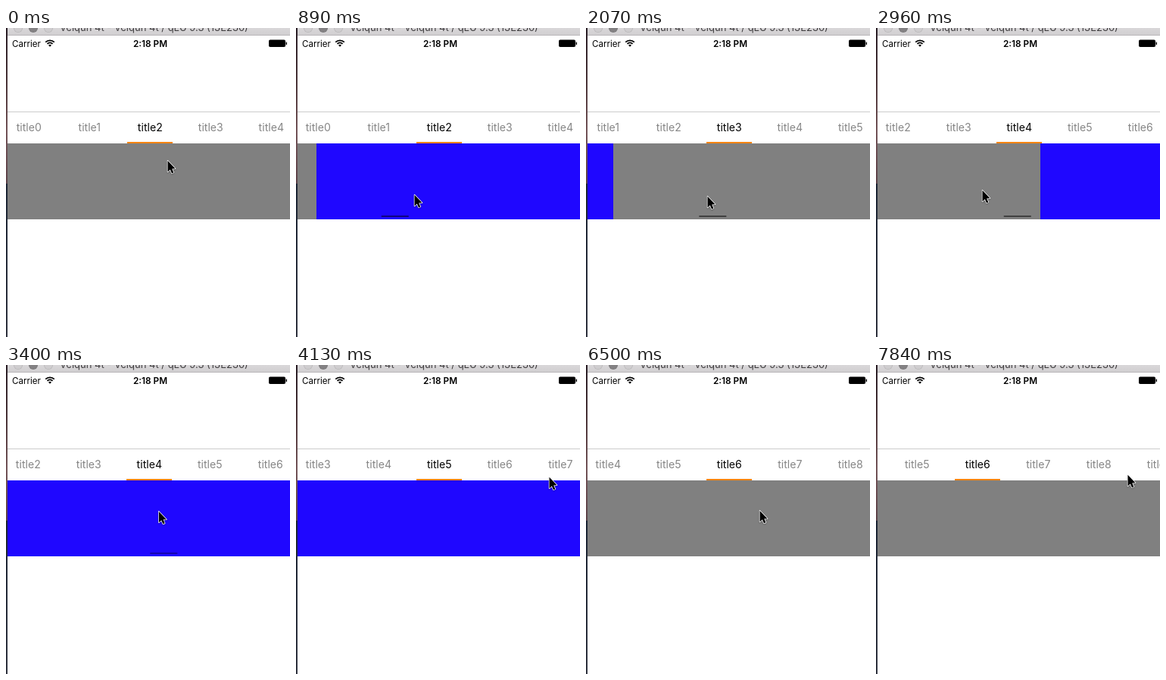
Recreate the animation shown at these times as an HTML page with a canvas. Size 375 by 407 pixels, loop 7990 ms.

```html
<!DOCTYPE html>
<html lang="en">
<head>
<meta charset="utf-8">
<title>Tabbed pager</title>
<style>
  html, body { margin: 0; width: 100%; height: 100%; overflow: hidden; background: #fff; }
  canvas { display: block; width: 375px; height: 407px; }
</style>
</head>
<body>
<canvas id="stage"></canvas>
<script>
const W = 375, H = 407, LOOP = 7990, STEP = 148, LAST = 53;
const LEFT = 2, PAGE_W = 375, TAB_GAP = 80, TAB_MID = 189, TABS = 10;
const FONT = 'Inter, "Open Sans", sans-serif';

// Times count screen refreshes of STEP ms.
const SWIPES = [2.632, 10.744, 18.196];
const SWIPE_TIME = 4, SETTLE = 5, TAP = 38.5;

// Tab bar movements: start, duration, distance in tabs.
const GLIDES = [
  [0, 1, 0.0125],
  ...SWIPES.map(s => [s + SETTLE, 2.5, 1]),
  [32, 5, 2.15],
  [38, 2.5, -1.15],
  [49, 4, 0.6875]
];

// Turning points of the pointer: time, x, y.
const POINTER = [
  [0, 213, 174], [3, 290, 218], [6, 156, 219], [11, 300, 224],
  [14, 160, 221], [18, 290, 216], [20, 140, 213], [28, 334, 147],
  [37, 256, 132], [39, 92, 130], [45, 240, 196], [50, 366, 136], [53, 332, 144]
];

const canvas = document.getElementById('stage');
const ctx = canvas.getContext('2d');
const dpr = window.devicePixelRatio || 1;
canvas.width = W * dpr;
canvas.height = H * dpr;

const sum = list => list.reduce((a, b) => a + b, 0);

function ease(n, start, duration) {
  const u = Math.max(0, Math.min(1, (n - start) / duration));
  return u * u * (3 - 2 * u);
}

function pointerAt(n) {
  const i = Math.max(1, POINTER.findIndex(p => p[0] >= n));
  const [t0, x0, y0] = POINTER[i - 1], [t1, x1, y1] = POINTER[i];
  const u = ease(n, t0, t1 - t0);
  return [x0 + (x1 - x0) * u, y0 + (y1 - y0) * u];
}

function stateAt(n) {
  const tapped = n >= TAP ? 1 : 0;
  return {
    page: 2 + tapped + sum(SWIPES.map(s => ease(n, s, SWIPE_TIME))),
    selected: 2 + tapped + SWIPES.filter(s => n >= s + SETTLE).length,
    scroll: 1.9875 + sum(GLIDES.map(([s, d, by]) => by * ease(n, s, d))),
    bar: sum(SWIPES.map(s => ease(n, s, 1) - ease(n, s + SWIPE_TIME, 2)))
  };
}

function rect(x, y, w, h, color) {
  ctx.fillStyle = color;
  ctx.fillRect(x, y, w, h);
}

function pill(x, y, w, h, r, color) {
  ctx.fillStyle = color;
  ctx.beginPath();
  ctx.roundRect(x, y, w, h, r);
  ctx.fill();
}

function disc(x, y, r, color) {
  ctx.fillStyle = color;
  ctx.beginPath();
  ctx.arc(x, y, r, 0, Math.PI * 2);
  ctx.fill();
}

function text(str, x, y, font, color, align = 'left') {
  ctx.font = font + ' ' + FONT;
  ctx.fillStyle = color;
  ctx.textAlign = align;
  ctx.fillText(str, x, y);
}

function gradient(height, ...colors) {
  const g = ctx.createLinearGradient(0, 0, 0, height);
  colors.forEach((c, i) => g.addColorStop(i / (colors.length - 1), c));
  return g;
}

function drawWindow() {
  rect(0, 0, W, H, '#fff');
  rect(0, 0, LEFT, 205, gradient(205, '#2b2028', '#4a3438', '#75565a', '#5c4248'));
  rect(0, 205, LEFT, H - 205, gradient(H, '#15171f', '#1b2433', '#30333f'));
  rect(LEFT, 0, W - LEFT, 10, gradient(10, '#d9d7d9', '#d0ced0'));
  rect(LEFT, 9, W - LEFT, 1, '#b9b7b9');
  for (let i = 0; i < 3; i++) {
    const x = 16 + 20 * i;
    disc(x, 0, 6, i === 1 ? '#777577' : '#b9b7b9');
    disc(x, 0, 5.2, i === 1 ? '#838183' : '#cfcdcf');
  }
  text('Velqun 4t - Velqun 4t / qLU 9.3 (13E230)', 71, 4, '13px', '#3f3d3f');
}

function drawStatus() {
  text('Carrier', 8, 24.5, '11.6px', '#000');
  text('2:18 PM', 190.5, 24.5, '600 11.8px', '#000', 'center');

  const from = -Math.PI * 0.75, to = -Math.PI * 0.25;
  ctx.strokeStyle = '#000';
  ctx.lineWidth = 1.8;
  for (const r of [5, 8.2]) {
    ctx.beginPath();
    ctx.arc(58, 24.5, r, from, to);
    ctx.stroke();
  }
  ctx.beginPath();
  ctx.moveTo(58, 24.7);
  ctx.arc(58, 24.7, 2.8, from, to);
  ctx.fill();

  pill(347, 15.5, 22, 9.5, 1.8, '#000');
  rect(369.6, 18.6, 1.4, 3.4, '#000');
}

function drawTabs({ scroll, selected }) {
  rect(LEFT, 110, W - LEFT, 1, '#cbcbcb');
  for (let i = 0; i < TABS; i++) {
    const x = TAB_MID + TAB_GAP * (i - scroll);
    const on = i === selected;
    text('title' + i, x + 0.3, 136, '14.1px', on ? '#000' : '#868686', 'center');
    if (on) rect(x - 30, 150, 60, 2, '#f8840a');
  }
}

function drawPages({ page, bar }) {
  const first = Math.floor(page);
  for (let i = first; i <= first + 1; i++) {
    const x = Math.round(LEFT + PAGE_W * (i - page));
    rect(x, 152, PAGE_W, 100, i % 2 ? '#1f07ff' : '#808080');
  }
  const x = LEFT + 0.5 + page * PAGE_W / TABS;
  pill(x, 247, 36.5, 2, 1, `rgba(0, 0, 0, ${0.5 * bar})`);
}

function drawPointer(x, y) {
  const outline = [[0, 0], [0, 14.6], [3.3, 11.6], [5.5, 16.6], [7.8, 15.6], [5.7, 10.7], [10, 10.5]];
  ctx.save();
  ctx.translate(x + 0.5, y + 0.8);
  ctx.beginPath();
  outline.forEach(p => ctx.lineTo(...p));
  ctx.closePath();
  ctx.lineJoin = 'round';
  ctx.lineWidth = 1.5;
  ctx.strokeStyle = '#fff';
  ctx.shadowColor = 'rgba(0, 0, 0, 0.3)';
  ctx.shadowBlur = 2 * dpr;
  ctx.shadowOffsetY = dpr;
  ctx.stroke();
  ctx.shadowColor = 'transparent';
  ctx.fillStyle = '#000';
  ctx.fill();
  ctx.restore();
}

function draw(ms) {
  // The picture is held for each refresh; 20 ms absorbs timer rounding.
  const n = Math.min(LAST, Math.floor((ms % LOOP + 20) / STEP));
  const state = stateAt(n);

  ctx.setTransform(dpr, 0, 0, dpr, 0, 0);
  drawWindow();
  drawStatus();
  ctx.save();
  ctx.beginPath();
  ctx.rect(LEFT, 0, W - LEFT, H);
  ctx.clip();
  drawTabs(state);
  drawPages(state);
  ctx.restore();
  drawPointer(...pointerAt(n));
}

const start = performance.now();
function tick() {
  draw(performance.now() - start);
  requestAnimationFrame(tick);
}
tick();
</script>
</body>
</html>
```
